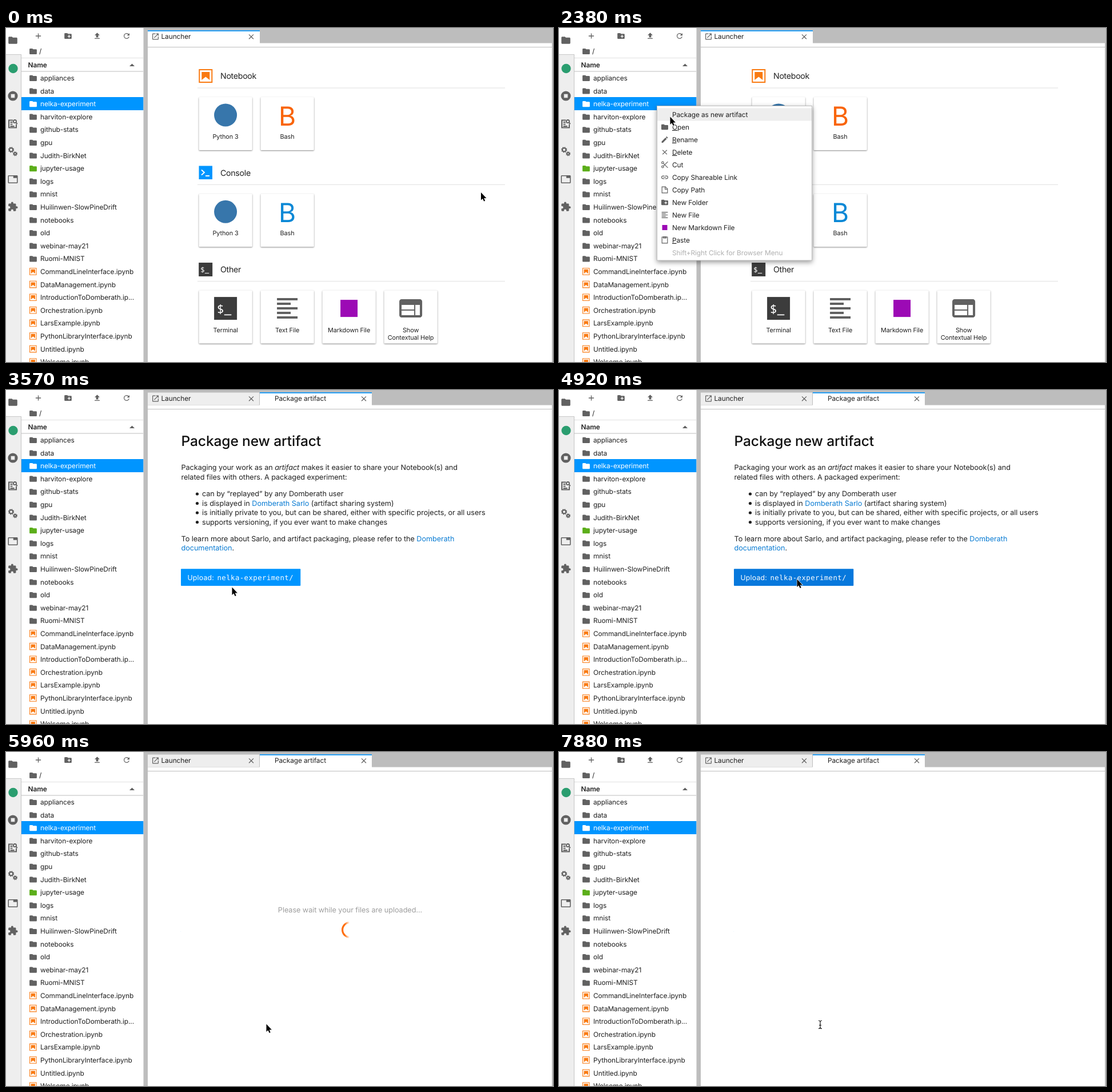
These frames come from a looping animation (957 px wide and 585 px high, 8 s). An HTML page:

```html
<!DOCTYPE html>
<html lang="en">
<head>
<meta charset="utf-8">
<title>Package artifact</title>
<style>
  html, body { margin: 0; width: 100%; height: 100%; overflow: hidden; background: #fff; }
  svg { display: block; }
  text { font: 11.9px Inter, "Open Sans", sans-serif; letter-spacing: -.1px; fill: #212121;
    text-rendering: geometricPrecision; white-space: pre; }
  .bold { font-weight: 600; }
  .head { font-size: 14.2px; letter-spacing: -.3px; }
  .label { font-size: 10.9px; letter-spacing: -.1px; text-anchor: middle; }
  .letter { font-size: 46px; text-anchor: middle; }
  .title { font-size: 24.6px; font-weight: 550; letter-spacing: -.15px; fill: #111; }
  .body { font-size: 12.7px; letter-spacing: -.07px; }
  .wait { text-anchor: middle; fill: #9e9e9e; }
  .link { fill: #0a7cd3; }
  .btn { font-size: 12.3px; letter-spacing: .2px; fill: #fff; }
  .mono { font: 12.3px "DejaVu Sans Mono", monospace; letter-spacing: .45px; fill: #fff; }
  .shell { font: 21px "Noto Sans Mono", monospace; letter-spacing: 0; fill: #fff; }
  .key { text-decoration: underline; }
  .off { fill: #b0b0b0; }
  .sel { fill: #fff; }
  .card { fill: #fff; filter: drop-shadow(0 1px 1.3px #0007); }
  .popup { fill: #fff; stroke: #bdbdbd; filter: drop-shadow(0 3px 4px #0006); }
</style>
</head>
<body>
<svg id="stage" width="957" height="585" viewBox="0 0 957 585"></svg>
<script>
const GREY = '#616161', EDGE = '#bdbdbd', BLUE = '#0095ff', ORANGE = '#f97a12', PURPLE = '#9c0ab5';

const icons = {
  folder: 'M10 4H4c-1.100 0-2 .9-2 2v12c0 1.100.9 2 2 2h16c1.100 0 2-.9 2-2V8c0-1.100-.9-2-2-2h-8z',
  newFolder: 'M20 6h-8l-2-2H4c-1.100 0-2 .9-2 2v12c0 1.100.9 2 2 2h16c1.100 0 2-.9 2-2V8c0-1.100-.9-2-2-2zm-1 8h-3v3h-2v-3h-3v-2h3V9h2v3h3z',
  add: 'M19 13h-6v6h-2v-6H5v-2h6V5h2v6h6z',
  upload: 'M5 20h14v-2H5zm0-10h4v6h6v-6h4l-7-7z',
  refresh: 'M17.650 6.350A8 8 0 1019.730 14h-2.080A6 6 0 1112 6c1.660 0 3.140.69 4.220 1.780L13 11h7V4z',
  tabs: 'M21 3H3c-1.100 0-2 .9-2 2v14c0 1.100.9 2 2 2h18c1.100 0 2-.9 2-2V5c0-1.100-.9-2-2-2zm0 16H3V5h10v4h8z',
  puzzle: 'M20.500 11H19V7c0-1.100-.9-2-2-2h-4V3.500a2.500 2.500 0 00-5 0V5H4c-1.100 0-2 .9-2 2v3.800h1.500a2.700 2.700 0 010 5.400H2V20c0 1.100.9 2 2 2h3.800v-1.500a2.700 2.700 0 015.400 0V22H17c1.100 0 2-.9 2-2v-4h1.500a2.500 2.500 0 000-5z',
  launch: 'M19 19H5V5h7V3H5a2 2 0 00-2 2v14a2 2 0 002 2h14a2 2 0 002-2v-7h-2zM14 3v2h3.590l-9.830 9.830 1.410 1.410L19 6.410V10h2V3z',
  close: 'M19 6.410L17.590 5 12 10.590 6.410 5 5 6.410 10.590 12 5 17.590 6.410 19 12 13.410 17.590 19 19 17.590 13.410 12z',
  lines: 'M15 15H3v2h12zm0-8H3v2h12zM3 13h18v-2H3zm0 8h18v-2H3zM3 3v2h18V3z',
  help: 'M20 4H4c-1.100 0-2 .9-2 2v12c0 1.100.9 2 2 2h16c1.100 0 2-.9 2-2V6c0-1.100-.9-2-2-2zm-5 14H4v-4h11zm0-5H4V9h11zm5 5h-4V9h4z',
  edit: 'M3 17.250V21h3.750L17.810 9.940l-3.750-3.750zM20.710 7.040a1 1 0 000-1.410l-2.340-2.340a1 1 0 00-1.410 0l-1.830 1.830 3.750 3.750z'
};
const outlines = {
  cut: 'M6 3a3 3 0 100 6 3 3 0 000-6zM6 15a3 3 0 100 6 3 3 0 000-6zM8 8L21 21M8 16L21 3',
  chain: 'M11 8H7a4 4 0 000 8h4M13 8h4a4 4 0 010 8h-4M8 12h8',
  file: 'M4 3h10l6 6v12H4zM13 3v7h7',
  paste: 'M4 3h16v18H4zM8 2h8v4H8z'
};

const text = (x, y, s, cls = '') => `<text x="${x}" y="${y}" class="${cls}">${s}</text>`;
const rect = (x, y, w, h, fill, more = '') =>
  `<rect x="${x}" y="${y}" width="${w}" height="${h}" fill="${fill}" ${more}/>`;
const dot = (x, y, r, fill) => `<circle cx="${x}" cy="${y}" r="${r}" fill="${fill}"/>`;
const line = (d, w, color = GREY, more = '') =>
  `<path d="${d}" fill="none" stroke="${color}" stroke-width="${w}" ${more}/>`;
const at = (x, y, s, inner) => `<g transform="translate(${x} ${y}) scale(${s}) translate(-12 -12)">${inner}</g>`;
const icon = (name, x, y, s, fill = GREY) => at(x, y, s, icons[name]
  ? `<path d="${icons[name]}" fill="${fill}"/>` : line(outlines[name], 2));
const notebook = (x, y, size) => `<g transform="translate(${x} ${y}) scale(${size / 24})">`
  + line('M-11-11h22v22h-22z', 2, ORANGE) + `<path d="M-7-7H7V7L0 1.500-7 7z" fill="${ORANGE}"/></g>`;
const shell = (x, y, s) => `<g transform="translate(${x} ${y}) scale(${s})">`
  + rect(-20, -20, 40, 40, '#3c3c3c') + text(-15, 9, '$_', 'shell') + '</g>';
const group = (id, inner) => `<g id="${id}">${inner}</g>`;

const TOP = 76.2, PITCH = 22.6, SELECTED = 2;
const files = `appliances data nelka-experiment harviton-explore github-stats gpu Judith-BirkNet
  jupyter-usage logs mnist Huilinwen-SlowPineDrift notebooks old webinar-may21 Ruomi-MNIST
  CommandLineInterface.ipynb DataManagement.ipynb IntroductionToDomberath.ip... Orchestration.ipynb
  LarsExample.ipynb PythonLibraryInterface.ipynb Untitled.ipynb Welcome.ipynb`.split(/\s+/);

function gear(x, y, r) {
  const teeth = 2 * Math.PI * (r + 1.2) / 16;
  return `<g fill="none" stroke="${GREY}"><circle cx="${x}" cy="${y}" r="${r}" stroke-width="2"/>`
    + `<circle cx="${x}" cy="${y}" r="${r + 1.2}" stroke-width="1.8" stroke-dasharray="${teeth}"/></g>`;
}

function sidebar() {
  const rows = files.map((name, i) => {
    const y = TOP + PITCH * (i + .5), sel = i === SELECTED;
    const fill = sel ? '#fff' : name === 'jupyter-usage' ? '#5cae1a' : GREY;
    return (name.includes('.ip') ? notebook(47.3, y, 12.6) : icon('folder', 47.5, y + .4, .64, fill))
      + text(60, y + 4.5, name, sel ? 'sel' : '');
  }).join('');
  return rect(0, 0, 27, 585, '#eee') + rect(0, 0, 27, 46, '#fff')
    + rect(0, 46, 27, 1, '#c8c8c8') + rect(26, 47, 1, 538, '#c4c4c4')
    + icon('folder', 12, 21.5, .78) + dot(12.5, 71, 8.2, '#2a9d6f')
    + dot(12, 119, 8.6, GREY) + rect(8.7, 115.700, 6.6, 6.6, '#eee', 'rx=".6"')
    + line('M12 161.500H5v13h13v-6M7.500 165h4M7.500 168.500h4M7.500 172h7', 2)
    + line('M15.500 161a2.600 2.600 0 100 5.200 2.600 2.600 0 000-5.200zM17.300 165.500l2.500 2.500', 1.8)
    + gear(9, 213.3, 3.1) + gear(16, 220.3, 2)
    + icon('tabs', 12, 265, .78) + icon('puzzle', 12, 313, .78)
    + icon('add', 56.5, 14, .66) + icon('newFolder', 108.5, 14, .63)
    + icon('upload', 159.5, 14, .63) + icon('refresh', 211, 14, .63)
    + icon('folder', 47.5, 41, .64) + text(58, 45, '/')
    + rect(27, 52, 213, 1, '#e0e0e0') + text(38.5, 69, 'Name', 'bold') + rect(27, 75.500, 213, 1, EDGE)
    + `<path d="M216 67h9l-4.500-4.500z" fill="${GREY}"/>`
    + rect(27, 0, 213, PITCH, '#eee', 'id="hover"')
    + rect(27, 121, 213.500, 23, BLUE) + rows;
}

function frame() {
  const active = x => rect(x, 4, 196, 24, '#fff') + rect(x, 4, 196, 1.8, '#1297f5');
  return rect(240.5, 0, 716.5, 585, EDGE) + rect(248, 26.5, 707, 559, '#fff') + rect(248, 33, 707, 1, EDGE)
    + group('tabOne', active(248))
    + group('tabTwo', rect(248, 4.5, 195, 21.5, '#eee') + active(444)
      + text(470, 19.3, 'Package artifact') + icon('close', 626, 15.3, .63))
    + icon('launch', 261.5, 15, .61) + text(271.500, 19.3, 'Launcher') + icon('close', 429, 15.3, .63);
}

function card(col, row, label, art) {
  const x = 337.5 + 108 * col, y = 121 + 169.3 * row, mid = x + 46.6;
  const words = label.split('|').map((s, i) => text(mid, y + 73 + 13 * i, s, 'label')).join('');
  return rect(x, y, 93.3, 93, '#fff', 'class="card" rx="1.5"') + art(mid, y + 31.5) + words;
}

function launcher() {
  const python = (x, y) => dot(x, y, 20, '#3776ab');
  const bash = fill => (x, y) => `<text x="${x}" y="${y + 18}" class="letter" style="fill:${fill}">B</text>`;
  const heads = ['Notebook', 'Console', 'Other'].map((s, i) =>
    text(375, 89.2 + 169.3 * i, s, 'head') + rect(335, 104.5 + 169.3 * i, 538, 1, '#e0e0e0')).join('');
  return heads + notebook(349.3, 84, 24)
    + rect(337.5, 241.5, 23.5, 23.5, BLUE) + line('M342 248.500l5 4.500-5 4.500M349 259h7', 1.8, '#fff')
    + shell(349.2, 423, .6)
    + card(0, 0, 'Python 3', python) + card(1, 0, 'Bash', bash('#f9640a'))
    + card(0, 1, 'Python 3', python) + card(1, 1, 'Bash', bash('#0a88d6'))
    + card(0, 2, 'Terminal', (x, y) => shell(x, y, 1))
    + card(1, 2, 'Text File', (x, y) => icon('lines', x, y, 2))
    + card(2, 2, 'Markdown File', (x, y) => rect(x - 15, y - 15, 30, 30, PURPLE))
    + card(3, 2, 'Show|Contextual Help', (x, y) => icon('help', x, y, 2));
}

function page() {
  const link = s => `<tspan class="link">${s}</tspan>`;
  const points = ['can by “replayed” by any Domberath user',
    `is displayed in ${link('Domberath Sarlo')} (artifact sharing system)`,
    'is initially private to you, but can be shared, either with specific projects, or all users',
    'supports versioning, if you ever want to make changes'];
  return text(306.5, 97.5, 'Package new artifact', 'title')
    + text(306.5, 140.3, 'Packaging your work as an <tspan font-style="italic">artifact</tspan> makes it easier to share your Notebook(s) and', 'body')
    + text(306.5, 156.8, 'related files with others. A packaged experiment:', 'body')
    + points.map((s, i) => dot(334.5, 182 + 16.5 * i, 2.6, '#212121')
      + text(343, 186 + 16.5 * i, s, 'body')).join('')
    + text(306.5, 264.5, `To learn more about Sarlo, and artifact packaging, please refer to the ${link('Domberath')}`, 'body')
    + text(306.5, 281, link('documentation') + '.', 'body')
    + rect(306, 313.3, 209.3, 29.7, BLUE, 'id="button" rx="1"')
    + text(317.5, 333, 'Upload:', 'btn') + text(369.5, 333, 'nelka-experiment/', 'mono');
}

function menu() {
  const key = s => `<tspan class="key">${s[0]}</tspan>${s.slice(1)}`;
  const items = [['', 'Package as new artifact'], ['folder', key('Open')], ['edit', key('Rename')],
    ['close', key('Delete')], ['cut', 'Cut'], ['chain', 'Copy Shareable Link'], ['file', 'Copy Path'],
    ['newFolder', 'New Folder'], ['lines', 'New File'], ['square', 'New Markdown File'],
    ['paste', key('Paste')], ['', 'Shift+Right Click for Browser Menu']];
  return rect(171.5, 136.5, 271, 270.5, '#fff', 'class="popup"')
    + rect(172, 140.500, 270, 22, '#eee', 'id="mark"')
    + items.map(([name, s], i) => {
      const y = 151.5 + 22 * i;
      const art = name === 'square' ? rect(180.5, y - 4.5, 9, 9, PURPLE) : name && icon(name, 185, y, .6);
      return art + text(198, y + 4.3, s, i === 11 ? 'off' : '');
    }).join('');
}

const waiting = text(602, 280.5, 'Please wait while your files are uploaded...', 'body wait')
  + `<linearGradient id="fade" gradientUnits="userSpaceOnUse" x1="-14.5" y1="0" x2="14.5" y2="0">
     <stop offset=".2" stop-color="#ff6d0a"/><stop offset=".48" stop-color="#ff6d0a" stop-opacity="0"/></linearGradient>
     <circle id="spin" r="12.9" fill="none" stroke="url(#fade)" stroke-width="3.2"/>`;

const pointer = '<path id="arrow" d="M0 0V13.400L3 10.700 5.100 15.600 7.200 14.700 5.200 9.900H9.400z" stroke="#fff" stroke-width="1.2" paint-order="stroke"/>'
  + `<g id="beam">${line('M454 470.500q3 0 3 2v10q0 2-3 2M460 470.500q-3 0-3 2v10q0 2 3 2M455 478.500h4', 1.2, '#111')}</g>`;

document.getElementById('stage').innerHTML = rect(0, 0, 957, 585, '#fff') + sidebar() + frame()
  + group('launcher', launcher()) + group('page', page()) + group('waiting', waiting)
  + group('menu', menu()) + pointer;

const $ = id => document.getElementById(id);
const show = (id, on) => { $(id).style.display = on ? '' : 'none'; };

// The screen changes every STEP ms; path rows are [step, x, y].
const LOOP = 8000, STEP = 148.6;
const path = [[2, 831, 288], [3, 790, 270], [4, 650, 212], [5, 470, 150], [6, 325, 111], [7, 232, 148],
  [8, 180, 146], [9, 168.5, 135], [13, 168.5, 135], [14, 174, 141], [16, 194.5, 155.5], [20, 194.5, 155.5],
  [21, 230, 200], [22, 310, 285], [23, 375, 335], [24, 395.5, 345.5], [26, 395.5, 345.5],
  [27, 402, 344], [29, 416.5, 331.5], [33, 416.5, 331.5], [34, 419, 345], [35, 428, 390],
  [36, 440, 440], [37, 450, 472], [38, 455, 482], [40, 455.5, 476.5]];

function pointerAt(k) {
  const i = path.findIndex(p => p[0] >= k);
  if (i < 1) return (i ? path.at(-1) : path[0]).slice(1);
  const [a, b] = [path[i - 1], path[i]], f = (k - a[0]) / (b[0] - a[0]);
  return [1, 2].map(n => a[n] + (b[n] - a[n]) * f);
}

function draw(now) {
  const k = Math.floor((now % LOOP + 8) / STEP), [x, y] = pointerAt(k);
  const inMenu = k >= 12 && k < 19, packaging = k >= 19;
  show('tabOne', !packaging);
  show('tabTwo', packaging);
  show('launcher', !packaging);
  show('page', packaging && k < 34);
  show('waiting', k >= 34 && k < 49);
  show('menu', inMenu);
  show('mark', x > 172 && y > 142);
  show('arrow', k < 53);
  show('beam', k >= 53);
  const row = Math.floor((y - TOP) / PITCH);
  show('hover', !inMenu && x > 27 && x < 241 && row !== SELECTED);
  $('hover').setAttribute('y', TOP + row * PITCH);
  const over = x > 306 && x < 515 && y > 314 && y < 343;
  $('button').setAttribute('fill', over ? '#0778dc' : BLUE);
  $('spin').setAttribute('transform', `translate(601.5 311.5) rotate(${(k - 40) * STEP * .36})`);
  $('arrow').setAttribute('transform', `translate(${x} ${y})`);
}

function tick() {
  draw(performance.now());
  requestAnimationFrame(tick);
}
tick();
</script>
</body>
</html>
```
